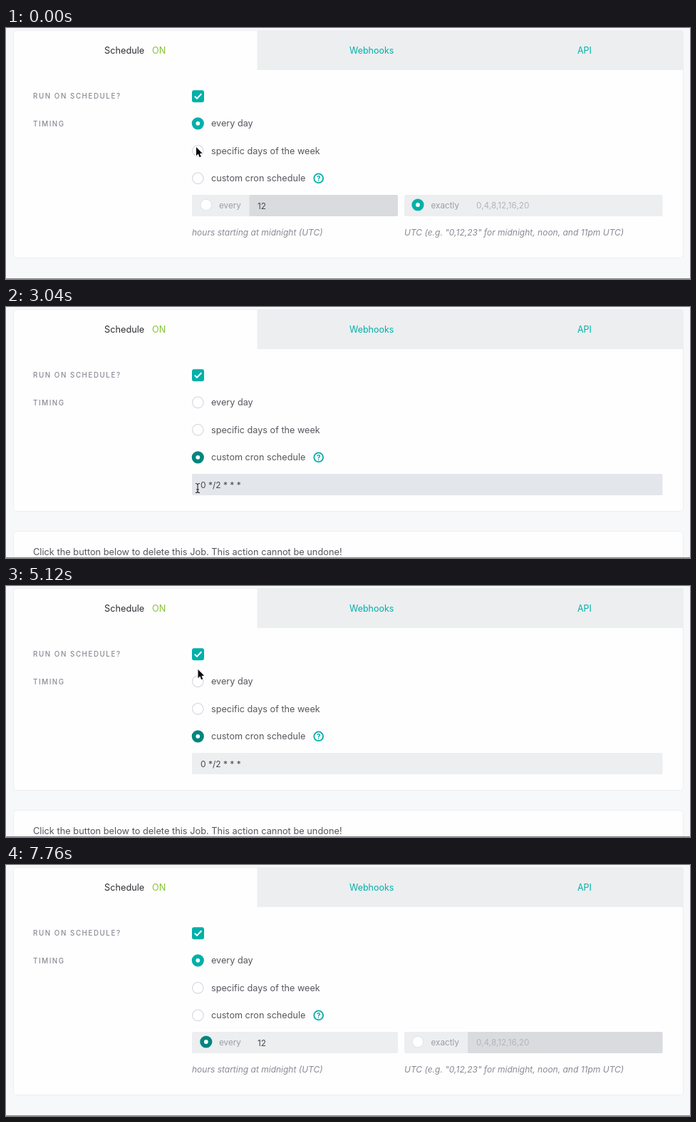
These frames come from a looping animation (960 by 352 pixels, 7840 ms). An HTML page with a canvas:

```html
<!DOCTYPE html>
<html lang="en">
<head>
<meta charset="utf-8">
<title>Schedule settings</title>
<style>
html, body { margin: 0; width: 100%; height: 100%; overflow: hidden; background: #f7f8fa; }
canvas { display: block; width: 960px; height: 352px; }
</style>
</head>
<body>
<canvas id="stage" width="960" height="352"></canvas>
<script>
const ctx = document.getElementById('stage').getContext('2d');
const LOOP = 7840, STEP = 80;
const C = {
  page: '#f7f8fa', card: '#fefefe', edge: '#eceef1', tab: '#eceef0',
  field: '#eceef0', hover: '#e3e6ea', off: '#d9dbde', teal: '#00b0a9',
  deep: '#00857f', ink: '#303036', body: '#56575e', label: '#898b94',
  faint: '#9b9da4', ghost: '#b3b5bb', ring: '#d3d6e0'
};
const SANS = 'Inter, "Open Sans", sans-serif';
const DAYS = [['Sunday', 269], ['Monday', 352.5], ['Tuesday', 439], ['Wednesday', 527.5],
  ['Thursday', 636.5], ['Friday', 730.5], ['Saturday', 805.5]];

// time, x, y of the pointer tip
const PATH = [
  [0, 267, 167], [1200, 269.5, 170], [1680, 269.5, 170], [2240, 272, 217],
  [2400, 272, 217], [2720, 269, 249], [3040, 269, 254], [4240, 269, 254],
  [5120, 269.5, 117], [5440, 269, 131], [5680, 269, 131], [6080, 285, 252], [7840, 285, 252]
];
const PRESSES = [[1360, 1600], [2800, 2960], [5520, 5680], [6480, 6640]];
const HIDE_AT = 7280;

function text(s, x, y, size, color, style = '', spacing = 0) {
  ctx.font = `${style} ${size}px ${SANS}`;
  ctx.letterSpacing = spacing + 'px';
  ctx.fillStyle = color;
  ctx.fillText(s, x, y);
}

function rect(x, y, w, h, fill, r = 0) {
  ctx.beginPath();
  ctx.roundRect(x, y, w, h, r);
  ctx.fillStyle = fill;
  ctx.fill();
}

function disc(x, y, r, fill) {
  ctx.beginPath();
  ctx.arc(x, y, r, 0, Math.PI * 2);
  ctx.fillStyle = fill;
  ctx.fill();
}

function outline(color, width) {
  ctx.strokeStyle = color;
  ctx.lineWidth = width;
  ctx.stroke();
}

function card(y, h) {
  rect(10.5, y + 0.5, 940, h, C.card, 4);
  outline(C.edge, 1);
}

function radio(x, y, on, focused, plain) {
  if (on) {
    disc(x, y, 8.6, focused ? C.deep : C.teal);
    disc(x, y, 2.9, '#fff');
  } else {
    disc(x, y, 7.8, '#fff');
    outline(plain ? '#e2e4e9' : C.ring, 1.1);
  }
}

function check(x, y, on, hot) {
  if (!on) {
    rect(x - 7.5, y - 7.5, 15.5, 15.5, '#fff', 3);
    outline(C.ring, 1);
    return;
  }
  rect(x - 8.5, y - 8.5, 17, 17, hot ? C.deep : C.teal, 3);
  ctx.beginPath();
  ctx.moveTo(x - 4.6, y);
  ctx.lineTo(x - 1.5, y + 3.2);
  ctx.lineTo(x + 4.8, y - 3.4);
  outline('#fff', 2);
}

function option(y, label, on, focused) {
  radio(269.3, y, on, focused);
  text(label, 288, y + 4.6, 12.65, C.body);
}

function help(y) {
  ctx.beginPath();
  ctx.arc(438.7, y, 6.4, 0, Math.PI * 2);
  outline('#00aca5', 1.8);
  ctx.textAlign = 'center';
  text('?', 438.7, y + 3.7, 10, '#00aca5', 'bold');
  ctx.textAlign = 'left';
}

function hourFields(y, hourly) {
  rect(261, y, 289, 30, C.field, 2);
  rect(559, y, 362.5, 30, C.field, 2);
  if (hourly) rect(648, y, 273.5, 30, C.off, 2);
  else rect(341.5, y, 208.5, 30, C.off, 2);
  radio(280.8, y + 14, hourly, true, true);
  radio(578, y + 14, !hourly, false, true);
  text('every', 299, y + 18.6, 11.7, C.faint);
  text('12', 353, y + 19.6, 11.8, '#47484e');
  text('exactly', 596.5, y + 18.6, 11.7, C.faint);
  text('0,4,8,12,16,20', 660, y + 19.4, 11.8, C.ghost);
  text('hours starting at midnight (UTC)', 261, y + 57, 12, C.label, 'italic');
  text('UTC (e.g. "0,12,23" for midnight, noon, and 11pm UTC)', 559, y + 57, 12, C.label, 'italic');
}

function pointerAt(t) {
  let i = 0;
  while (i < PATH.length - 2 && t >= PATH[i + 1][0]) i++;
  const [a, ax, ay] = PATH[i], [b, bx, by] = PATH[i + 1];
  const k = (t - a) / (b - a), e = k * k * (3 - 2 * k);
  return [ax + (bx - ax) * e, ay + (by - ay) * e];
}

function arrow(x, y) {
  ctx.save();
  ctx.translate(x, y);
  ctx.beginPath();
  [[0, 0], [0, 12.2], [2.8, 9.6], [4.7, 14.2], [6.8, 13.3], [4.9, 8.9], [8.6, 8.7]]
    .forEach(([px, py]) => ctx.lineTo(px, py));
  ctx.closePath();
  ctx.lineJoin = 'round';
  outline('#fff', 1.8);
  ctx.fillStyle = '#0a0a0c';
  ctx.fill();
  ctx.restore();
}

function beam(x, y) {
  ctx.beginPath();
  ctx.moveTo(x - 3, y - 6.5);
  ctx.quadraticCurveTo(x, y - 6.5, x, y - 4.5);
  ctx.lineTo(x, y + 4.5);
  ctx.quadraticCurveTo(x, y + 6.5, x - 3, y + 6.5);
  ctx.moveTo(x + 3, y - 6.5);
  ctx.quadraticCurveTo(x, y - 6.5, x, y - 4.5);
  ctx.moveTo(x, y + 4.5);
  ctx.quadraticCurveTo(x, y + 6.5, x + 3, y + 6.5);
  ctx.moveTo(x - 2, y + 2);
  ctx.lineTo(x + 2, y + 2);
  outline('#26262a', 1.1);
}

function draw(t) {
  const clicks = PRESSES.filter(p => t >= p[1]).length;
  const mode = ['daily', 'weekly', 'cron', 'daily', 'daily'][clicks];
  const hourly = clicks === 4;
  const [x, y] = pointerAt(t);
  const overField = mode === 'cron' && x > 261 && y > 234 && y < 264;

  rect(0, 0, 960, 352, C.page);
  card(3, { daily: 319, weekly: 360, cron: 283 }[mode]);
  rect(352.5, 3, 598.5, 56, C.tab, [0, 4, 0, 0]);
  text('Schedule', 138, 35.5, 12.75, C.ink);
  text('ON', 205, 35.5, 12.7, '#86c232');
  text('Webhooks', 482, 35.5, 12.5, C.teal);
  text('API', 802, 35.5, 12.5, C.teal);
  text('RUN ON SCHEDULE?', 38, 99.4, 9.8, C.label, '500', 1.55);
  text('TIMING', 38, 137.6, 9.8, C.label, '500', 1.55);
  check(269.5, 95.7, true, false);

  option(133.8, 'every day', mode === 'daily', clicks === 3);
  option(172.3, 'specific days of the week', mode === 'weekly', true);
  const cronY = mode === 'weekly' ? 249.2 : 210.8;
  if (mode === 'weekly') {
    for (const [day, dx] of DAYS) {
      const hot = Math.abs(x - dx) < 9 && Math.abs(y - 211) < 9;
      check(dx, 210.8, day[0] === 'S', hot);
      text(day, dx + 18.6, 215.4, 12.65, C.body);
    }
  }
  option(cronY, 'custom cron schedule', mode === 'cron', true);
  help(cronY);

  if (mode === 'cron') {
    rect(261, 234, 660.5, 30, overField ? C.hover : C.field, 2);
    text('0 */2 * * *', 273, 253.6, 12, '#47484e');
    card(314, 60);
    text('Click the button below to delete this Job. This action cannot be undone!', 38, 348, 12.8, C.body);
  } else {
    hourFields(mode === 'weekly' ? 272.4 : 234, hourly);
  }
  rect(0, 351, 960, 1, '#808288');

  if (t >= HIDE_AT) return;
  if (overField) beam(x, y);
  else arrow(x, y);
  if (PRESSES.some(([a, b]) => t >= a && t < b)) {
    ctx.beginPath();
    ctx.arc(x, y + 0.5, 20, 0, Math.PI * 2);
    outline('#111114', 1.8);
  }
}

const start = performance.now();
function tick() {
  const t = Math.max(0, performance.now() - start) % LOOP;
  draw(Math.floor(t / STEP) * STEP);
  requestAnimationFrame(tick);
}
tick();
</script>
</body>
</html>
```
